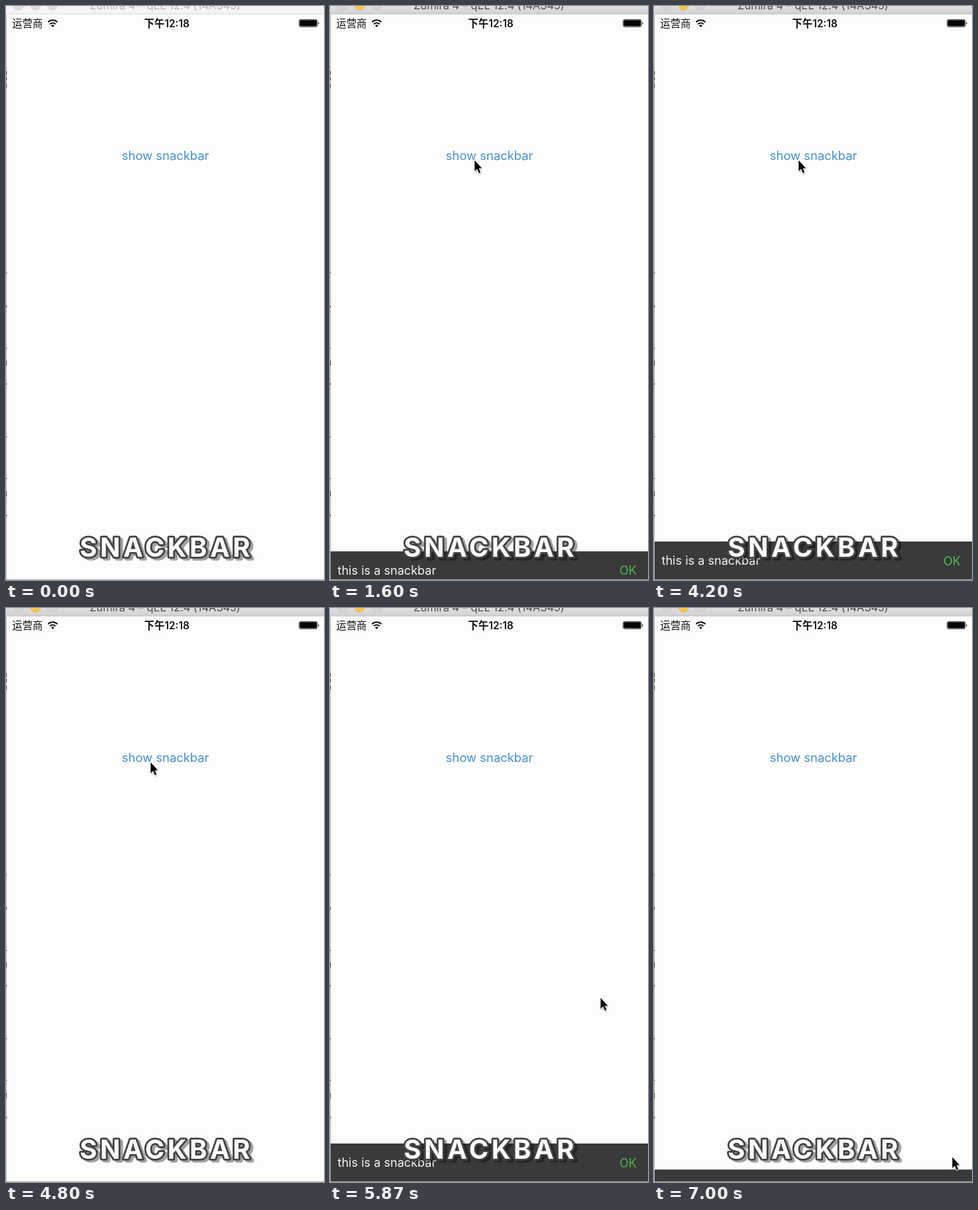
Animation of 480x865 px, one loop 7070 ms. Source, as an HTML page:

```html
<!DOCTYPE html>
<html lang="zh">
<head>
<meta charset="utf-8">
<title>Snackbar</title>
<style>
html, body { margin: 0; width: 100%; height: 100%; overflow: hidden; background: #fefdfe; }
svg { display: block; width: 480px; height: 865px; font-family: Inter, "Noto Sans CJK SC", "Noto Sans CJK", sans-serif; }
.status { font-size: 15.4px; fill: #111; }
.label { font-size: 18.1px; }
.mid { text-anchor: middle; }
.logo { font-size: 40px; font-weight: 700; letter-spacing: 4.5px; stroke-linejoin: round; stroke-width: 5.6px; }
</style>
</head>
<body>
<svg viewBox="0 0 480 865">
  <defs>
    <linearGradient id="chrome" x2="0" y2="1">
      <stop stop-color="#e0dee0"/><stop offset="1" stop-color="#d3d1d3"/>
    </linearGradient>
    <clipPath id="screen"><path d="M1 12H480V864H1z"/></clipPath>
    <filter id="soft" x="-50%" y="-50%" width="200%" height="200%"><feGaussianBlur stdDeviation="1.2"/></filter>
    <path id="arrow" d="M0 0V16.5L3.8 13 6.4 19.3 9 18.2 6.4 12H11z"/>
  </defs>

  <rect width="480" height="865" fill="#fefdfe"/>
  <rect id="bar" width="480" height="12"/>
  <path id="rule" d="M0 12H480" stroke-width="1"/>
  <g id="lights" stroke-width="1">
    <circle cx="19" cy="-1.5" r="7.5"/><circle cx="44.5" cy="-1.5" r="7.5"/><circle cx="70" cy="-1.5" r="7.5"/>
  </g>
  <text id="title" class="mid" x="240" y="5" font-size="16.4">Zumira 4 – qEL 12.4 (14A345)</text>

  <path d="M.5 12V865" stroke="#b5b4b6"/>
  <path id="marks" stroke="#333" stroke-width="1.4"/>
  <path d="M0 864.5H480" stroke="#aaa9ab"/>

  <g class="status">
    <text x="9.3" y="31.5">运营商</text>
    <text class="mid" x="242.7" y="31.5" font-weight="600">下午12:18</text>
  </g>
  <g fill="none" stroke="#111" stroke-width="2">
    <path d="M63.5 24.2a10 10 0 0 1 14 0M66.2 27.2a6.2 6.2 0 0 1 8.6 0"/>
    <path d="M68.1 29.5a3.4 3.4 0 0 1 4.8 0L70.5 32z" fill="#111" stroke="none"/>
    <rect x="442.4" y="20.4" width="27.6" height="11" rx="2.2" stroke="#333" stroke-width=".9"/>
    <rect x="443.3" y="21.3" width="25.8" height="9.2" rx="1.4" fill="#050505" stroke="none"/>
    <path d="M471.3 24a2.2 2.2 0 0 1 0 4z" fill="#222" stroke="none"/>
  </g>

  <text id="link" class="mid" x="240.7" y="232" font-size="18.4" fill="#4a90c6">show snackbar</text>

  <g clip-path="url(#screen)">
    <g id="snack" class="label">
      <rect x="1" y="807" width="479" height="58" fill="#3a393b"/>
      <text x="11.5" y="842" fill="#f4f4f4">this is a snackbar</text>
      <text id="ok" x="437" y="842.5" fill="#4dbb50">OK</text>
    </g>
  </g>

  <g class="logo mid">
    <text x="246.2" y="833" fill="#000" stroke="#000" opacity=".36">SNACKBAR</text>
    <text x="242.2" y="829.5" fill="#fdfdfd" stroke="#434245" paint-order="stroke">SNACKBAR</text>
  </g>

  <g id="pointer">
    <circle id="ring" cy=".4" r="28.6" fill="none" stroke="#161616" stroke-width="2"/>
    <use href="#arrow" x="1" y="2" opacity=".35" filter="url(#soft)"/>
    <use href="#arrow" x=".3" y="-.4" fill="#080808" stroke="#fff" stroke-width="1.8" stroke-linejoin="round" paint-order="stroke"/>
  </g>
</svg>
<script>
const LOOP = 7070;
const $ = id => document.getElementById(id);
const set = (el, attrs) => { for (const k in attrs) el.setAttribute(k, attrs[k]); };
const part = (t, from, length) => Math.min(1, Math.max(0, (t - from) / length));
const smooth = p => p * p * (3 - 2 * p);
const easeIn = p => p ** 1.6;
const easeOut = p => 1 - (1 - p) ** 2;
const within = (t, [from, to]) => t >= from && t < to;

// bits of the window behind, seen along the left edge
$('marks').setAttribute('d', [[98, 6], [107, 5], [117, 6], [401, 2], [451, 4], [515, 2], [534, 8],
  [568, 3], [648, 2], [711, 2], [731, 8], [766, 3]].map(([y, h]) => `M.3 ${y}v${h}`).join(''));

// start, duration, from, to, easing
const moves = [
  [70, 700, [-12, 93], [218, 233], smooth],
  [5400, 470, [218, 233], [408, 587], easeIn],
  [5870, 560, [408, 587], [450, 828], easeOut]
];
const linkPresses = [[1070, 1340], [5000, 5200]];
const okPress = [6670, 6820];
const ACTIVE = 1100, SLIDE = 300;

function pointerAt(t) {
  const [start, length, a, b, ease] = moves.filter(m => m[0] <= t).pop() || moves[0];
  const p = ease(part(t, start, length));
  return a.map((v, i) => v + (b[i] - v) * p);
}

function snackShown(t) {
  const slide = start => smooth(part(t, start, SLIDE));
  return slide(1400) - slide(4440) + slide(5260) - slide(6815);
}

function draw(now) {
  const t = now % LOOP;
  const active = t >= ACTIVE;
  const linkDown = linkPresses.some(p => within(t, p));
  const okDown = within(t, okPress);

  set($('bar'), { fill: active ? 'url(#chrome)' : '#f5f4f5' });
  set($('rule'), { stroke: active ? '#bab8ba' : '#d9d8d9' });
  set($('title'), { fill: active ? '#4c4a4c' : '#b6b5b6' });
  [...$('lights').children].forEach((c, i) => set(c, active
    ? { fill: i === 1 ? '#f5c54d' : '#d5d3d5', stroke: i === 1 ? '#e5b345' : '#c6c4c6' }
    : { fill: '#dddcdd', stroke: '#d3d2d3' }));

  set($('link'), { opacity: linkDown ? .22 : 1 });
  set($('ok'), { opacity: okDown ? .3 : 1 });
  set($('snack'), { transform: `translate(0 ${58 * (1 - snackShown(t))})` });
  set($('ring'), { visibility: linkDown || okDown ? 'inherit' : 'hidden' });
  set($('pointer'), {
    transform: `translate(${pointerAt(t)})`,
    visibility: t < 70 ? 'hidden' : 'visible'
  });
}

const began = performance.now();
function tick() {
  draw(performance.now() - began);
  requestAnimationFrame(tick);
}
tick();
</script>
</body>
</html>
```
